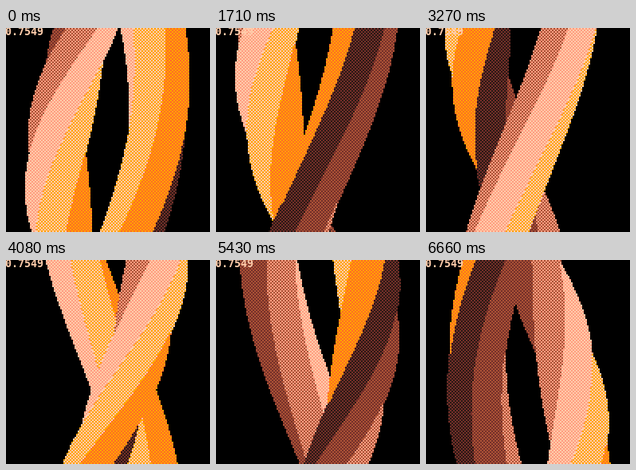
Recreate the animation shown at these times as an HTML page with a canvas. Size 256 by 256 pixels, loop 6690 ms.

```html
<!DOCTYPE html>
<html lang="en">
<head>
<meta charset="utf-8">
<title>Twisted strands</title>
<style>
  html, body { margin: 0; width: 100%; height: 100%; overflow: hidden; background: #000; }
  canvas { position: absolute; left: 0; top: 0; width: 256px; height: 256px; image-rendering: pixelated; }
  p {
    position: absolute; left: -1px; top: -1px; margin: 0;
    font: bold 13.3px/12px "DejaVu Sans Mono", "Liberation Mono", monospace;
    color: #ffccaa; white-space: pre;
  }
</style>
</head>
<body>
<canvas id="stage" width="128" height="128"></canvas>
<p>0.7549</p>
<script>
const SIZE = 128, STEP = 30, FRAMES = 223;
const ORBIT = 32, RADIUS = 20, SIDES = 6;
const TWIST = 360 / 512; // degrees per row
const ctx = document.getElementById("stage").getContext("2d");

// One checkered colour pair per face, in order around the hexagon
const faces = [
  ["#291814", "#742f29"],
  ["#742f29", "#ab5236"],
  ["#ab5236", "#ff9d81"],
  ["#ff9d81", "#ffccaa"],
  ["#ffccaa", "#ffa300"],
  ["#ffa300", "#ff6c24"]
].map(checker);

// Angles in degrees: orbit start, spin start, spin per step, spin per row
const strands = [
  { orbit: -26, spin: 202.5, speed: 5.04, twist: 1.5 * TWIST },
  { orbit: 118, spin: 83, speed: 10.8, twist: 0.5 * TWIST }
];

function checker([a, b]) {
  const tile = document.createElement("canvas");
  tile.width = tile.height = 2;
  const t = tile.getContext("2d");
  t.fillStyle = a;
  t.fillRect(0, 0, 2, 2);
  t.fillStyle = b;
  t.fillRect(1, 0, 1, 1);
  t.fillRect(0, 1, 1, 1);
  return ctx.createPattern(tile, "repeat");
}

const rad = deg => deg * Math.PI / 180;
const sin = deg => Math.sin(rad(deg));
const cos = deg => Math.cos(rad(deg));

// Each face is a horizontal line that includes both end pixels
function drawSlice({ x, spin }, y) {
  const vertex = i => x + RADIUS * sin(spin + i * 360 / SIDES);
  faces.forEach((fill, i) => {
    const left = vertex(i), right = vertex(i + 1);
    if (right <= left) return;
    const from = Math.floor(left);
    ctx.fillStyle = fill;
    ctx.fillRect(from, y, Math.floor(right) - from + 1, 1);
  });
}

function draw(n) {
  ctx.fillStyle = "#000";
  ctx.fillRect(0, 0, SIZE, SIZE);
  for (let y = 0; y < SIZE; y++) {
    strands
      .map(s => {
        const angle = s.orbit - 7.2 * n - TWIST * y;
        return {
          x: SIZE / 2 + ORBIT * sin(angle),
          depth: cos(angle),
          spin: s.spin + s.speed * n - s.twist * y
        };
      })
      .sort((a, b) => a.depth - b.depth)
      .forEach(slice => drawSlice(slice, y));
  }
}

const start = performance.now();
let shown = -1;

function tick() {
  const n = Math.floor((performance.now() - start) / STEP) % FRAMES;
  if (n !== shown) draw(shown = n);
  requestAnimationFrame(tick);
}
tick();
</script>
</body>
</html>
```
